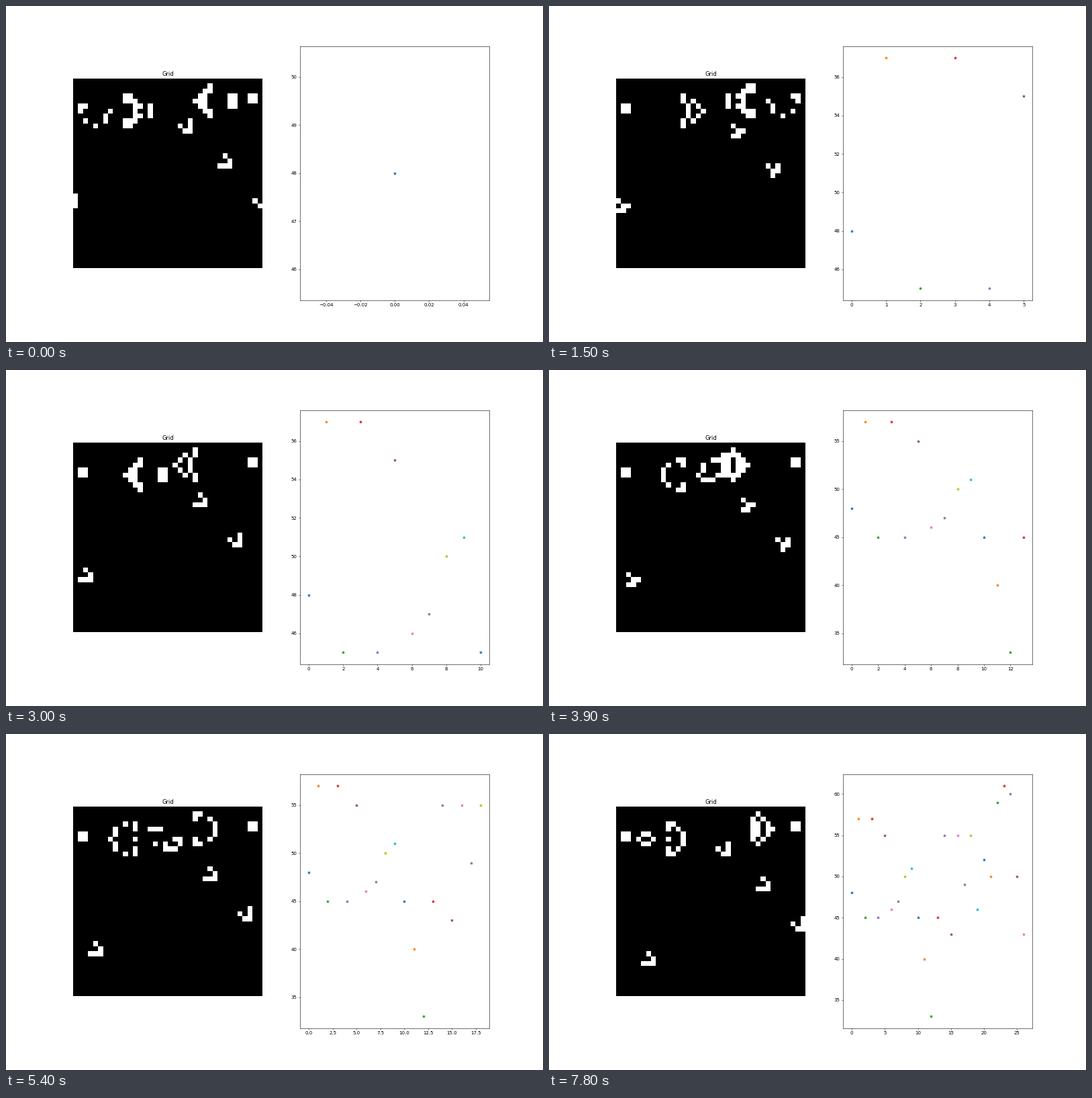
Recreate the animation shown at these times as a matplotlib script. Size 800 by 500 pixels, loop 8 s.

```python
import matplotlib.pyplot as plt
import numpy as np
from matplotlib.animation import FuncAnimation

SIZE = 38
WARM_UP = 81          # generations already played when the loop starts
GENERATIONS = 27
TICK_MS = 100
TICKS_PER_GENERATION = 3
TICKS = 80


def add_block(grid, row, column):
    grid[row:row + 2, column:column + 2] = 1


def add_mirrored(grid, axis_row, points):
    """Set cells given as (column, distance) on both sides of a row."""
    for column, distance in points:
        grid[[axis_row - distance, axis_row + distance], column] = 1


def glider_gun():
    grid = np.zeros((SIZE, SIZE), dtype=int)
    add_block(grid, 5, 1)
    add_block(grid, 3, 35)
    add_mirrored(grid, 6, [(13, 3), (14, 3), (12, 2), (16, 2), (11, 1),
                           (17, 1), (11, 0), (15, 0), (17, 0), (18, 0)])
    add_mirrored(grid, 4, [(21, 0), (22, 0), (21, 1), (22, 1),
                           (23, 2), (25, 2), (25, 3)])
    return grid


def next_grid(grid):
    """One step of Conway's rules on a torus."""
    around = sum(np.roll(grid, (dy, dx), axis=(0, 1))
                 for dy in (-1, 0, 1) for dx in (-1, 0, 1)) - grid
    return ((around == 3) | ((grid == 1) & (around == 2))).astype(int)


history = [glider_gun()]
for _ in range(WARM_UP + GENERATIONS - 1):
    history.append(next_grid(history[-1]))

grids = history[WARM_UP:]
changed = [np.count_nonzero(new != old)
           for old, new in zip(history[WARM_UP - 1:], grids)]

fig, (grid_ax, plot_ax) = plt.subplots(1, 2, figsize=(16, 10), dpi=50)
fig.subplots_adjust(left=0.125, right=0.9, bottom=0.125, top=0.88, wspace=0.2)

grid_ax.set_title("Grid")
grid_ax.axis("off")
image = grid_ax.imshow(grids[0], cmap="gray", vmin=0, vmax=1,
                       interpolation="nearest")


def update(tick):
    generation = tick // TICKS_PER_GENERATION
    image.set_data(grids[generation])
    plot_ax.clear()
    for step, count in enumerate(changed[:generation + 1]):
        plot_ax.plot(step, count, "*", color=f"C{step % 10}")


animation = FuncAnimation(fig, update, frames=TICKS, interval=TICK_MS,
                          repeat=True, repeat_delay=0)
plt.show()
```
